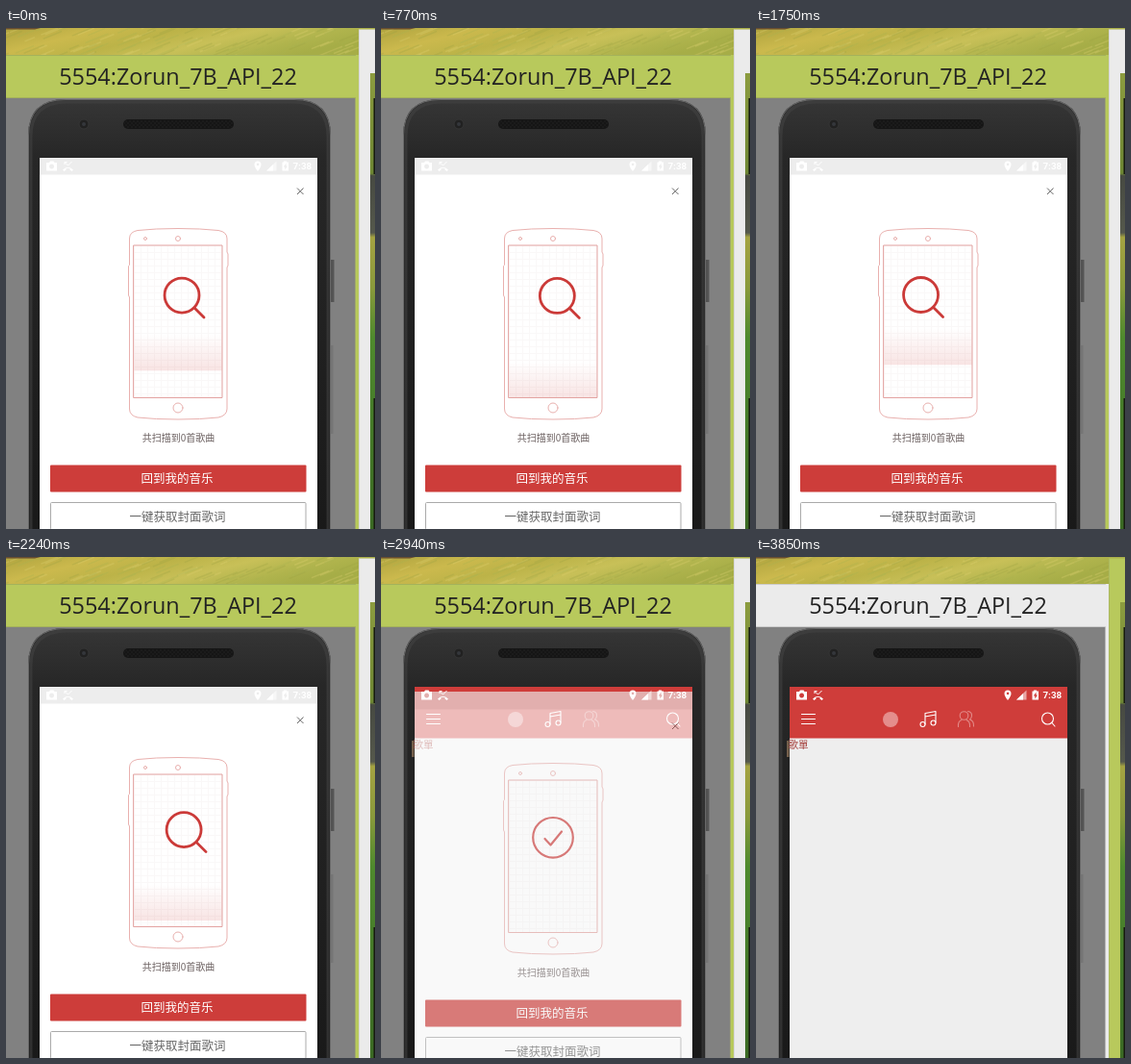
Recreate the animation shown at these times as an HTML page. Size 384x521 px, loop 3920 ms.

```html
<!DOCTYPE html>
<html lang="zh">
<head>
<meta charset="utf-8">
<style>
html, body { margin: 0; width: 100%; height: 100%; overflow: hidden; background: #818181; }
svg { display: block; width: 384px; height: 521px; }
.cjk { font-family: "Noto Sans CJK SC", "Noto Sans CJK", sans-serif; text-anchor: middle; }
.line { fill: none; stroke-linecap: round; stroke-linejoin: round; }
</style>
</head>
<body>
<svg viewBox="0 0 384 521">
  <defs>
    <linearGradient id="field" x2="1" y2=".3">
      <stop offset="0" stop-color="#b0a43f"/><stop offset=".25" stop-color="#cbb94d"/>
      <stop offset=".45" stop-color="#bcb348"/><stop offset=".65" stop-color="#c8c058"/>
      <stop offset=".85" stop-color="#b0b44d"/><stop offset="1" stop-color="#a6ad47"/>
    </linearGradient>
    <linearGradient id="meadow" x2="0" y2="1">
      <stop offset="0" stop-color="#8c9c3f"/><stop offset=".22" stop-color="#6f8835"/>
      <stop offset=".225" stop-color="#474a42"/><stop offset=".35" stop-color="#55584c"/>
      <stop offset=".36" stop-color="#a5a342"/><stop offset=".47" stop-color="#8a9a3c"/>
      <stop offset=".58" stop-color="#4f8a2e"/><stop offset="1" stop-color="#3c6b25"/>
    </linearGradient>
    <linearGradient id="shell" x2="0" y2="1">
      <stop offset="0" stop-color="#363636"/><stop offset=".13" stop-color="#272727"/>
      <stop offset="1" stop-color="#191919"/>
    </linearGradient>
    <linearGradient id="glow" x2="0" y2="1">
      <stop offset="0" stop-color="#cc3c39" stop-opacity="0"/>
      <stop offset="1" stop-color="#cc3c39" stop-opacity=".14"/>
    </linearGradient>
    <pattern id="grid" width="7" height="7" x="133" y="226" patternUnits="userSpaceOnUse">
      <path d="M0 .5H7M.5 0V7" stroke="#faf8f8" fill="none"/>
    </pattern>
    <pattern id="mesh" width="4" height="4" patternUnits="userSpaceOnUse">
      <circle cx="1" cy="1" r=".7" fill="#262626"/><circle cx="3" cy="3" r=".7" fill="#262626"/>
    </pattern>
    <clipPath id="display"><path d="M35 135H324V521H35Z"/></clipPath>
    <clipPath id="scanArea"><path d="M133.5 226.5H224.5V384H133.5Z"/></clipPath>
    <clipPath id="strip"><path d="M0 0H367V28H0Z"/></clipPath>
  </defs>

  <!-- desktop and windows -->
  <rect width="384" height="28" fill="url(#field)"/>
  <g id="grass" clip-path="url(#strip)" stroke-width="1.5"></g>
  <path d="M0 0H36L30 1.500H0Z" fill="#6b5030"/>
  <path id="leftWindow" d="M0 28H367V521H0Z"/>
  <path d="M0 28.5H364M0 72.5H364" stroke="#555" stroke-opacity=".2"/>
  <path d="M0 73H363.5V521H0Z" fill="#818181"/>
  <path id="rightWindow" d="M367 1.500H384V521H367Z"/>
  <path d="M367.5 2V521" stroke="#777" stroke-opacity=".2"/>
  <path d="M379 47H384V521H379Z" fill="url(#meadow)"/>
  <path d="M382.500 73H384V152H382.500ZM382.500 385H384V521H382.500Z" fill="#161a10"/>
  <text x="179" y="59" font-size="23.4" fill="#222" text-anchor="middle" font-family="'Open Sans', sans-serif">5554:Zorun_7B_API_22</text>

  <!-- handset -->
  <path d="M338 241H341.500V285H338Z" fill="#545454"/>
  <path d="M338 330H340.500V422H338Z" fill="#757575"/>
  <path d="M23 530V112Q23 74 62 74H300Q338 74 338 112V530Z" fill="url(#shell)"/>
  <g fill="none">
    <path d="M26 530V113Q26 77 63 77H299Q335 77 335 113V530" stroke="#444" stroke-width="3" stroke-opacity=".55"/>
    <path d="M23.500 530V112Q23.500 74.500 62 74.500H300Q337.500 74.500 337.500 112V530" stroke="#666"/>
  </g>
  <rect x="122" y="95" width="115" height="10" rx="5" fill="#151515"/>
  <rect x="123" y="96" width="113" height="8" rx="4" fill="url(#mesh)"/>
  <circle cx="81" cy="100" r="5" fill="#212121" stroke="#363636"/>
  <circle cx="81" cy="100" r="2" fill="#34373b"/>

  <!-- music home page -->
  <path d="M35 135H324V521H35Z" fill="#eee"/>
  <path d="M35 135H324V188.500H35Z" fill="#cf3d3a"/>
  <g class="line" stroke="#fff" stroke-width="1.1">
    <path d="M47.500 163.500H61.500M47.500 168.500H61.500M47.500 173.500H61.500" stroke-width="1"/>
    <circle cx="303.500" cy="168" r="6"/><path d="M308 172.500L311 176"/>
    <path d="M176 174V162.500L187 160.500V172M176 166L187 164"/>
    <circle cx="173.500" cy="174" r="2.500"/><circle cx="184.500" cy="172.500" r="2.500"/>
  </g>
  <circle cx="140" cy="169" r="8" fill="#e48e8c"/>
  <g class="line" stroke="#e28987" stroke-width="1.1">
    <circle cx="216.500" cy="165" r="4.300"/><path d="M210.500 176.500Q210 170.500 214 169.500M219 169.500Q223 171 222.500 176.500"/>
    <path d="M220.500 160.500Q225 161 224.500 165.500Q224 168 222.500 169Q227 170.500 226.500 176"/>
  </g>
  <g id="label">
    <path d="M32 191H34.500V208H32Z" fill="#75604c"/>
    <text class="cjk" x="44" y="199" font-size="10.5" fill="#a5403c">歌單</text>
  </g>

  <!-- scanning page -->
  <g clip-path="url(#display)"><g id="page">
    <path d="M35 135H324V521H35Z" fill="#fff"/>
    <path d="M35 134H324V152.500H35Z" fill="#ededed"/>
    <path d="M303 166.500L309.500 173M309.500 166.500L303 173" stroke="#666"/>
    <path d="M133 226H225V384H133Z" fill="url(#grid)"/>
    <g class="line" stroke="#e9b0ae">
      <path d="M128.500 246V219Q128.500 212 137 210.500Q155 208.500 179 208.500T221 210.500Q230 212 230 219V233L231 235V247L230 249V396Q230 403 221 405Q203 407 179 407T137 405Q128.500 403 128.500 396V280L127.500 278V248Z"/>
      <path d="M133 226H225V384.500H133Z" stroke="#e3a3a1"/>
      <circle cx="145" cy="219" r="1.500"/><circle cx="179" cy="219" r="2.500"/>
      <circle cx="179" cy="395" r="5"/>
    </g>
    <g id="scan">
      <g clip-path="url(#scanArea)"><rect id="band" x="133" y="-38" width="92" height="38" fill="url(#glow)"/></g>
      <g id="lens" class="line" stroke="#cb3a38" stroke-width="2.800">
        <circle r="18"/><path d="M13 13L23 23"/>
      </g>
    </g>
    <g id="done" class="line" stroke="#cb3a38" stroke-width="2.200">
      <circle cx="179" cy="285.800" r="20.800"/><path d="M170.500 287L176.500 293.500L188 279.500"/>
    </g>
    <text class="cjk" x="179.500" y="429.500" font-size="10" fill="#6a5f5f">共扫描到0首歌曲</text>
    <rect x="46" y="454.500" width="266.500" height="28" rx="1" fill="#cd3d3a"/>
    <text class="cjk" x="178" y="473" font-size="12.5" fill="#fff">回到我的音乐</text>
    <rect x="46.500" y="493.500" width="265.500" height="28" rx="1" fill="none" stroke="#aaa"/>
    <text class="cjk" x="178.500" y="512.500" font-size="12.5" fill="#666">一键获取封面歌词</text>
  </g></g>

  <!-- status icons -->
  <g fill="#fff">
    <path fill-rule="evenodd" d="M42 140H45L46 138.500H49.500L50.500 140H53V148.500H42ZM47.500 141.500A2.500 2.500 0 1 0 47.600 141.500Z"/>
    <path d="M59 147.500Q64.500 142 70 147.500L68.500 149L66.500 147.500V146Q64.500 145.300 62.500 146V147.500L60.500 149Z"/>
    <path d="M61 142V139.500H63.500M61 139.500L64.500 143L68.500 139" fill="none" stroke="#fff"/>
    <path fill-rule="evenodd" d="M262 149Q258.500 144.500 258.500 142A3.500 3.500 0 0 1 265.500 142Q265.500 144.500 262 149ZM262 140.600A1.300 1.300 0 1 0 262.100 140.600Z"/>
    <path d="M271 148.500L281.500 138.500V148.500Z" fill-opacity=".55"/><path d="M271 148.500L278 142V148.500Z"/>
    <path fill-rule="evenodd" d="M287.500 139.500H289V138.500H292V139.500H294V148.500H287.500ZM291.500 140.500L288.800 144.500H290.300V147.500L293 143.500H291.500Z"/>
    <text x="298.500" y="147" font-size="9.8" font-weight="700" font-family="Roboto, sans-serif">7:38</text>
  </g>
</svg>
<script>
const LOOP = 3920, STEP = 70, DONE = 2590, EXIT = 2800, HOME = 3150, SWITCH = 3850;
const GREEN = '#b8c95c', GREY = '#ebebeb';
const el = id => document.getElementById(id);
const show = (id, on) => el(id).setAttribute('visibility', on ? 'visible' : 'hidden');
const move = (id, x, y) => el(id).setAttribute('transform', `translate(${x} ${y})`);

let seed = 7;
const rand = () => (seed = seed * 16807 % 2147483647) / 2147483647;
let blades = '';
for (let i = 0; i < 120; i++) {
  const x = rand() * 380 - 10, y = rand() * 34, len = 8 + rand() * 16;
  const color = ['#9da343', '#dfd272', '#a9b350'][i % 3];
  blades += `<path d="M${x} ${y}l${len} ${-len * .4}" stroke="${color}" opacity=".3"/>`;
}
el('grass').innerHTML = blades;

function draw(now) {
  const t = Math.floor(now % LOOP / STEP) * STEP;

  // The lens circles anticlockwise while the glow sweeps down and slows.
  const a = -(42 + .463 * t) * Math.PI / 180;
  move('lens', 177 + 8.1 * Math.cos(a), 283.5 + 8.1 * Math.sin(a));
  const p = (t + 1030) % 1830 / 1830;
  move('band', 0, 385 - 150 * (1 - p) ** 2);
  show('scan', t < DONE);
  show('done', t >= DONE && t < HOME);

  // The page drops with acceleration and fades.
  const q = t < EXIT ? 0 : Math.min(1, .35 + .65 * (t - EXIT) / (HOME - EXIT));
  move('page', 0, Math.round(41 * q ** 4));
  el('page').setAttribute('opacity', Math.min(1, (1 - q) / .6));
  show('label', t > EXIT);

  const swapped = t >= SWITCH;
  el('leftWindow').setAttribute('fill', swapped ? GREY : GREEN);
  el('rightWindow').setAttribute('fill', swapped ? GREEN : GREY);
  requestAnimationFrame(() => draw(performance.now() - start));
}
const start = performance.now();
draw(0);
</script>
</body>
</html>
```
